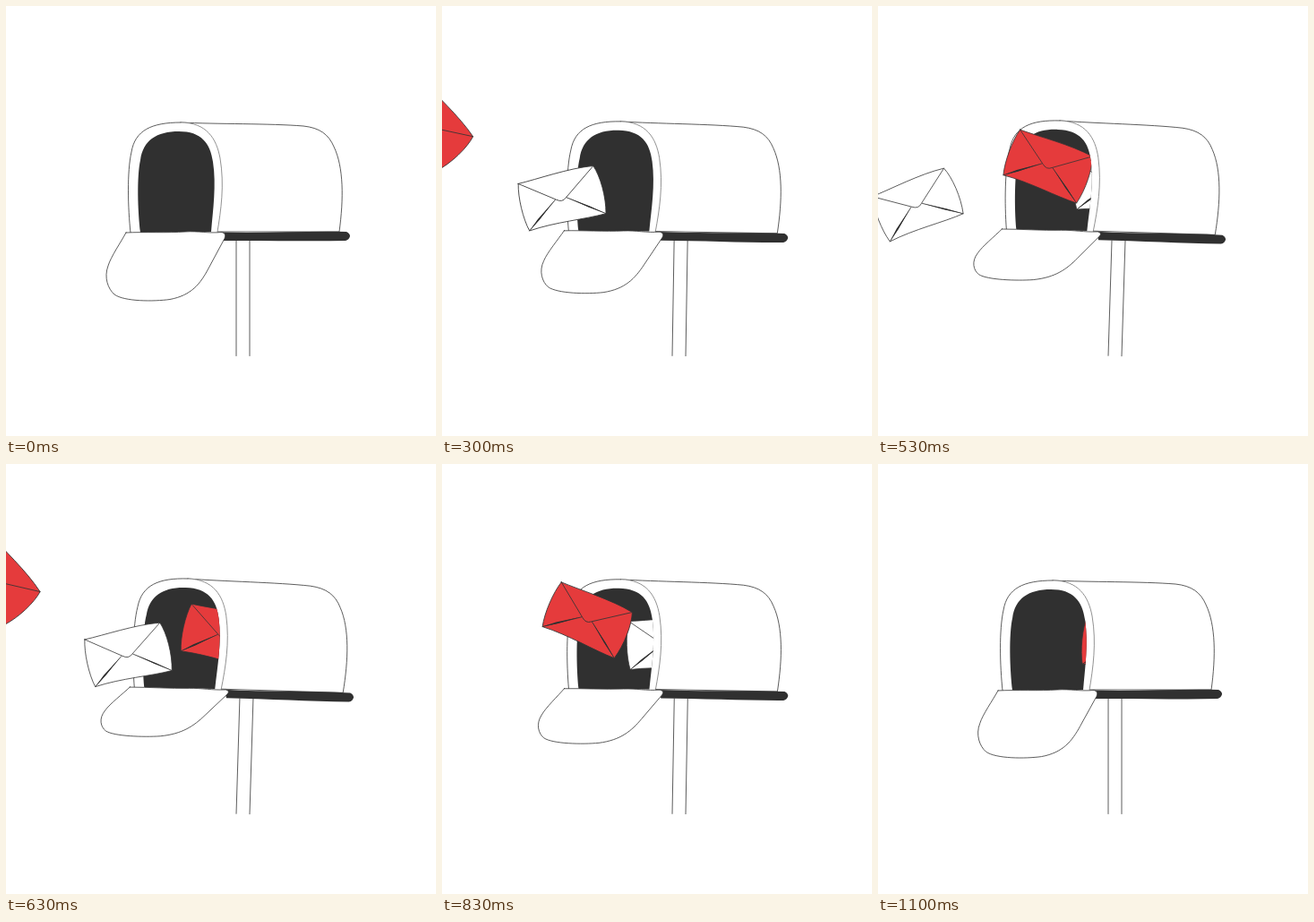
Recreate the animation shown at these times as an HTML page. Size 480 by 480 pixels, loop 1130 ms.

```html
<!DOCTYPE html>
<html lang="en">
<head>
<meta charset="utf-8">
<title>Mailbox</title>
<style>
  html, body { margin: 0; width: 100%; height: 100%; overflow: hidden; background: #fff; }
  svg { display: block; width: 100%; height: 100%; }
  .line { fill: none; stroke: #343434; stroke-width: .8; stroke-linejoin: round; stroke-linecap: round; vector-effect: non-scaling-stroke; }
  .paper { fill: #fff; }
  .red { fill: #e53b3c; }
  .rim { stroke: #777; }
  .ink { fill: #303030; }
</style>
</head>
<body>
<svg viewBox="0 0 480 480">
  <defs>
    <clipPath id="mouth">
      <path d="M-300 -100H193V140C218 140 228 153 231 174C235 200 231 228 229 252V400H-300Z"/>
    </clipPath>
    <g id="letter">
      <path class="line" d="M-43 -27C-20 -27 15 -31 43 -27C48 -14 49 10 44.500 28C20 29 -12 24 -43 27C-47 12 -47 -12 -43 -27Z"/>
      <path class="line" fill="none" d="M-43 -27L-6 0Q0 5 5 .5L43 -27M-43 27L-7 0M44.500 28L6 .5"/>
      <path class="ink" d="M-43 27L-31 16.500L-8 .5L-29 17.500ZM44.500 28L27 16.500L7 1L29 16Z"/>
    </g>
  </defs>
  <g id="box">
    <path class="line" d="M257 262V390.5M272 262V390.5"/>
    <path class="line paper" d="M195 130C235 132 295 131 332 134C350 136 360 143 366 157C377 180 377 215 372 252H236Z"/>
    <path class="ink" d="M240 252.500C285 254 335 251 380 252Q384 254 384 257Q383 261 379 262C335 263 290 261.500 242 262Z"/>
    <path class="paper" d="M139 253C136 225 135 185 140 163C144 139 162 130 195 130C224 130 235 148 239 170C244 200 240 228 236 252Z"/>
    <path class="line" d="M139 253C136 225 135 185 140 163C144 139 162 130 195 130"/>
    <path class="line rim" d="M195 130C224 130 235 148 239 170C244 200 240 228 236 252"/>
    <path class="ink" d="M150 253C147 228 146 190 150 172C153 150 168 140 193 140C218 140 228 153 231 174C235 200 231 228 229 252Z"/>
    <path id="door" class="line paper" d="M134 253C128 264 117 280 114 290C109 303 114 316 121 322C132 330 165 330 183 327.500C207 323 217 310 226 293L244 259.500Q246.500 254 241 252.500C225 254 215 251 200 252C180 253.500 155 252 134 253Z"/>
    <g id="letters" clip-path="url(#mouth)"></g>
  </g>
</svg>
<script>
const LOOP = 1130, STEP = 100 / 3, HINGE = 253;
const NS = 'http://www.w3.org/2000/svg';
const box = document.getElementById('box');
const door = document.getElementById('door');
const letters = document.getElementById('letters');

// Each kind flies along a straight line and turns evenly with distance.
const white = { fill: '#fff', delay: 134, y: 234, rise: -.131, angle: -27, turn: .097 };
const red = { fill: '#e53b3c', delay: 300, y: 140.5, rise: .22, angle: 44.5, turn: -.142 };

const mail = [white, red, white, red].map((kind, i) => {
  const el = document.createElementNS(NS, 'g');
  const shape = document.createElementNS(NS, 'use');
  shape.setAttribute('href', '#letter');
  el.append(shape);
  letters.append(el);
  return { el, kind, start: kind.delay + (i > 1 ? 10 * STEP : 0) };
});

// The sheet takes its letter's colour; the fold lines stay unfilled.
document.querySelector('#letter path').style.fill = 'var(--sheet)';
mail.forEach(({ el, kind }) => el.style.setProperty('--sheet', kind.fill));

// Smooth rise and fall around a centre time.
function swell(t, centre, half) {
  const u = Math.min(1, Math.abs(t - centre) / half);
  return (1 + Math.cos(Math.PI * u)) / 2;
}

// Fast in the open, slowing down inside the box.
function flight(t) {
  const d = t - 100;
  return 70 + 200 * Math.tanh(d / 225) + .05 * d;
}

function draw(t) {
  box.setAttribute('transform', `rotate(${1.8 * swell(t, 572, 565)} 264.5 391)`);

  const lift = swell(t, 635, 535);
  const skew = -.18 * lift, height = 1 - .28 * lift;
  door.setAttribute('transform',
    `matrix(1 0 ${skew} ${height} ${-skew * HINGE} ${HINGE * (1 - height)})`);

  for (const { el, kind, start } of mail) {
    const x = flight(t - start);
    const y = kind.y + kind.rise * x;
    const angle = kind.angle + kind.turn * x;
    el.setAttribute('transform', `translate(${x} ${y}) rotate(${angle})`);
  }
}

// Thirty poses a second, with changes on 10 ms ticks.
function pose(ms) {
  const tick = Math.floor((ms % LOOP) / 10) * 10;
  return Math.floor((tick + 3.4) / STEP) * STEP;
}

const begin = performance.now();
function run() {
  draw(pose(performance.now() - begin));
  requestAnimationFrame(run);
}
run();
</script>
</body>
</html>
```
